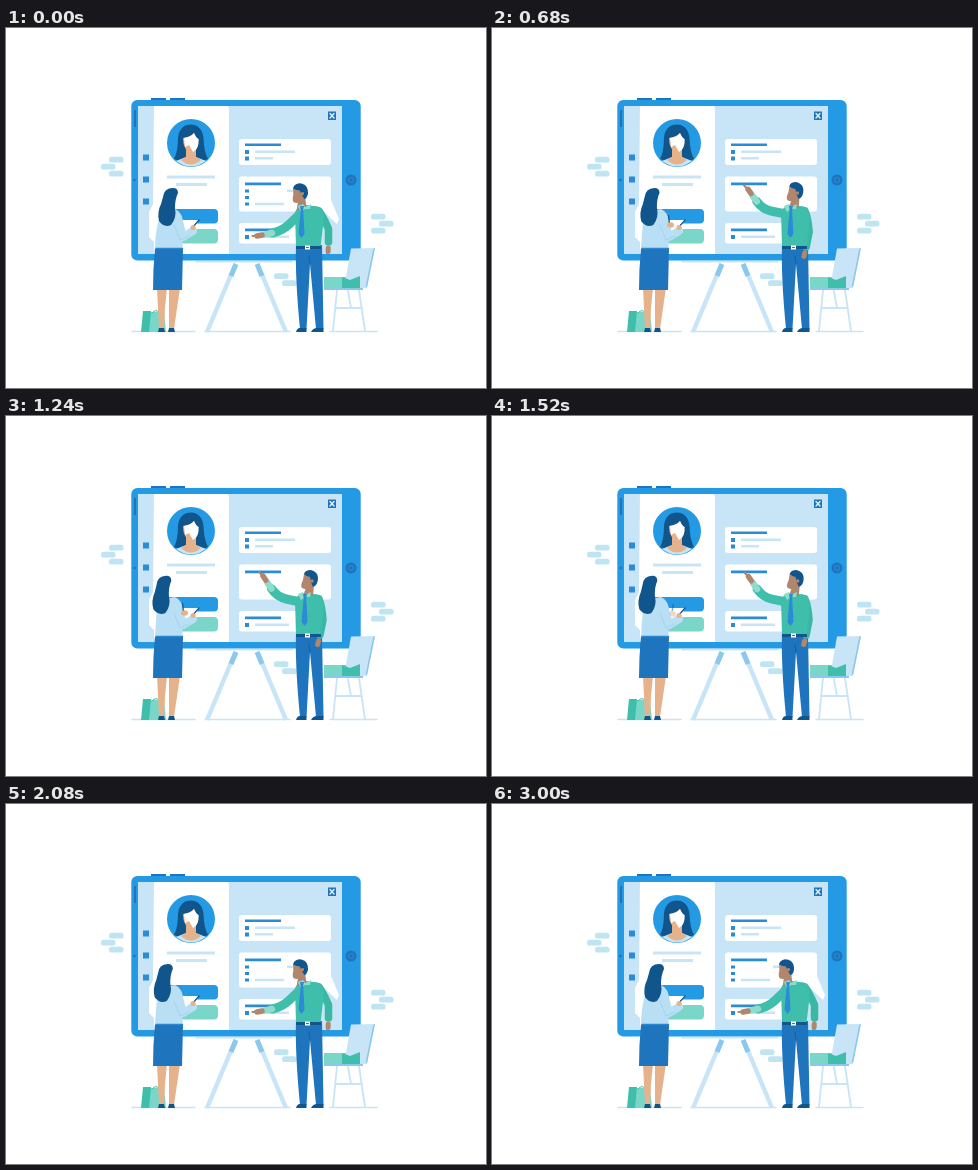
These frames come from a looping animation (480 px wide and 360 px high, 3040 ms). An HTML page:

```html
<!DOCTYPE html>
<html lang="en">
<head>
<meta charset="utf-8">
<title>Board presentation</title>
<style>
html, body { margin: 0; width: 100%; height: 100%; overflow: hidden; background: #fff; }
svg { display: block; width: 480px; height: 360px; }
.blue { fill: #259ae4; } .mid { fill: #1f75bd; } .dark { fill: #10568c; } .bar { fill: #2a8bd6; }
.pale { fill: #c8e5f7; } .mist { fill: #bfe4f2; } .white { fill: #fff; }
.teal { fill: #3fbfab; } .mint { fill: #7bd6ca; } .skin { fill: #e6b28c; } .tan { fill: #b0866c; }
.shirt { fill: #b9dff5; }
.line { fill: none; stroke-linecap: round; stroke-linejoin: round; }
</style>
</head>
<body>
<svg viewBox="0 0 480 360">
  <g id="clouds" class="mist"></g>

  <!-- easel -->
  <g class="line" stroke="#c8e5f7" stroke-width="1.6">
    <path d="M126 303.5H189M199 303.5H284M324 303.5H371M190 233.8H286"/>
    <path stroke-width="4.5" stroke-linecap="butt" d="M229.5 236L201 304M251.5 236L280 304"/>
    <path stroke="#8cc8ee" stroke-width="5" stroke-linecap="butt" d="M230 236L225 248M251 236L256 248"/>
  </g>

  <!-- board -->
  <path class="mid" d="M145 73v-3h15v3zM164 73v-3h15v3z"/>
  <rect class="blue" x="125.3" y="72" width="229.400" height="160.400" rx="6"/>
  <path class="mid" d="M128 82h2v17h-2z"/>
  <circle class="mid" cx="128.500" cy="152" r="1.300"/>
  <rect class="pale" x="132" y="78" width="204" height="148"/>
  <path class="white" d="M148 78H221Q223 78 223 82V226H148V214L143 209V184L147 176z"/>
  <circle class="mid" cx="345" cy="152" r="5.500"/>
  <circle class="line" cx="345" cy="152" r="2.500" stroke="#2c86cf" stroke-width="1.200"/>
  <path class="bar" d="M137 126.500h6v6h-6zM137 148.500h6v6h-6zM137 170.500h6v6h-6z"/>
  <path class="mid" d="M322 83.500h8v8.500h-8z"/>
  <path class="line" d="M324 85.500l4 4.500m0-4.500l-4 4.500" stroke="#e6f5fc" stroke-width="1.300"/>

  <!-- profile -->
  <circle class="blue" cx="185" cy="115" r="24"/>
  <path class="dark" d="M168 131Q172 124 172 109Q174 96.500 185 96.500Q196 97 197.500 110Q198 124 202 131Q194 135 185 133Q176 135 168 131z"/>
  <path class="pale" d="M170 133L180 129H190L200 133Q185 144 170 133z"/>
  <path class="skin" d="M180 120h10v9l5 3q-10 9-20 0l5-3z"/>
  <path class="skin" d="M177 110Q185 109 188 105Q190 110 192.500 111Q193 122 185.500 126Q177 122 177 110z"/>
  <path class="white" d="M178 110Q185 109 188 105Q190 110 192.500 111Q193 121 187 124L183 117L179 119z"/>
  <path class="pale" d="M161 147.500h48v3h-48zM170 155h31v3h-31z"/>
  <rect class="blue" x="160" y="181" width="52" height="14.500" rx="4"/>
  <rect class="mint" x="160" y="201" width="52" height="14.500" rx="4"/>

  <!-- cards -->
  <g class="white">
    <rect x="233" y="111" width="92" height="26" rx="3"/>
    <rect x="233" y="148.500" width="92" height="35" rx="3"/>
    <rect x="233" y="195" width="62" height="20.500" rx="3"/>
    <path id="gap" d="M312 172H325L333 191L331 196L316 182z"/>
  </g>
  <path class="bar" d="M239 115.500h36v2.600h-36zM239 154.600h36v2.600h-36zM239 200.600h36v2.600h-36z"/>
  <path class="bar" d="M239 122h4v4h-4zM239 128.500h4v4h-4zM239 207h4v4h-4z"/>
  <path class="pale" d="M249 122.500h40v2.500h-40zM249 129h18v2.500h-18zM249 207.500h34v2.500h-34z"/>
  <path id="bullets" class="bar" d="M239 161.500h4v3h-4zM239 168h4v3h-4zM239 174.500h4v3h-4z"/>
  <path id="rows" class="pale" d="M249 174.800h29v2.500h-29zM281 161.500h8v2.500h-8z"/>

  <!-- chair and laptop -->
  <g class="line" stroke="#c8e5f7" stroke-width="1.800">
    <path d="M331 262L327 303M353 262L359 303M329 280H356M342 263L345 280"/>
  </g>
  <path class="pale" d="M345 220.500L369 220L361 260H338z"/>
  <path class="line" d="M368 221L360.500 258" stroke="#8cc8ee" stroke-width="1.500"/>
  <path class="mint" d="M318 249H340V260H318z"/>
  <path class="teal" d="M336 249L344 252L354 248V260H336z"/>
  <path fill="#8cc8ee" d="M318 260h39v2h-39z"/>

  <!-- bag -->
  <path class="mint" d="M143 284h15l2 20h-21z"/>
  <path class="teal" d="M137 283h8l-2 21h-8z"/>
  <path class="line" d="M146 285q4-5 8 0" stroke="#3fbfab" stroke-width="1"/>

  <!-- woman -->
  <path class="skin" d="M151 260H161L159 280L158 301H153zM163 260H174L168 301H163z"/>
  <path class="dark" d="M152 304l1-4h5l1 4zM162 304l1-4h5l1 4z"/>
  <path class="mid" d="M149 220.500H177L176 262H147Q147 240 149 220.500z"/>
  <path id="blouse" class="shirt"/>
  <path class="line" d="M150 220.500H176.500" stroke="#2c86cf" stroke-width="1.500" stroke-linecap="butt"/>
  <path class="white" d="M177 192L193 192L186 204H176z"/>
  <path class="line" d="M186 200L193 192" stroke="#10568c" stroke-width="1.200"/>
  <path class="line" d="M172 190L177 209L187 203" stroke="#b9dff5" stroke-width="8"/>
  <path class="line" d="M168 197L174 212L183 208" stroke="#a1cfed" stroke-width=".8"/>
  <circle class="skin" cx="187" cy="199.500" r="2.500"/>
  <g id="pen">
    <path class="line" d="M177.500 196L176.500 187.500" stroke="#10568c" stroke-width="1.300"/>
    <ellipse class="skin" cx="178.500" cy="197" rx="3.500" ry="2.800"/>
  </g>
  <path id="hair" class="dark" d="M157 169Q158 160 167 160Q172 160 172 165Q169 171 169 180Q171 190 165 197Q158 200 153 193Q151 184 155 176z"/>

  <!-- man -->
  <path class="mid" d="M290 217H316L317.500 301H310L304 236L300.500 301H294Q289 250 290 217z"/>
  <path class="dark" d="M290 304q1-4 4-4h6.500v4zM305 304q2-4 6-4h6.500v4z"/>
  <path class="line" d="M304 236L303 228" stroke="#135f9f" stroke-width="1"/>
  <path id="farArm" class="line" stroke="#3bb8a4" stroke-width="7.500"/>
  <path id="farHand" class="line" stroke="#b0866c" stroke-width="5"/>
  <path class="teal" d="M289 184Q291 178 300 177L312 178.500Q319 182 317 198L314.500 219H290z"/>
  <path class="dark" d="M290 218h25v3h-25z"/>
  <path class="white" d="M299 217.500h5v4h-5z"/>
  <path class="line" d="M300.500 219.500h2" stroke="#1f75bd" stroke-width="1.200"/>
  <g id="head">
    <path class="tan" d="M301 169H308L307 180H297z"/>
    <path class="tan" d="M298 158Q303 154 308 157L307 170Q301 175 296 172Q294 170 297 164z"/>
    <path class="dark" d="M298 158Q299 154 305 154Q312 156 312 162Q312 169 307 171L305 166L304 161Q301 161 298 158z"/>
    <circle class="tan" cx="306" cy="165" r="1.700"/>
  </g>
  <path id="sleeve" class="line" stroke="#3fbfab" stroke-width="9"/>
  <path id="cuff" class="line" stroke="#8fdccd" stroke-width="6.500" stroke-linecap="butt"/>
  <path id="wrist" class="line" stroke="#b0866c" stroke-width="5.500"/>
  <path id="finger" class="line" stroke="#b0866c" stroke-width="2.200"/>
  <path fill="#8fdccd" d="M292 178L297 176L299 179L305 176L304 181L299 181L295 184z"/>
  <path id="tie" class="bar"/>
</svg>
<script>
const LOOP = 3040, STEP = 40;
const $ = id => document.getElementById(id);
const set = (id, name, value) => $(id).setAttribute(name, value);
const show = (id, on) => set(id, "visibility", on ? "visible" : "hidden");
const mix = (a, b, u) => a + (b - a) * u;
const mixPt = (a, b, u) => a.map((v, i) => mix(v, b[i], u));
const ease = u => u * u * (3 - 2 * u);

// Eased interpolation between [time, value] stops.
function track(stops, t) {
  const i = stops.findIndex(s => s[0] > t);
  if (i < 0) return stops[stops.length - 1][1];
  const [t0, a] = stops[i - 1], [t1, b] = stops[i];
  return mix(a, b, ease((t - t0) / (t1 - t0)));
}

// Parabola through a, m and b at u = 0, .5 and 1.
const bend = (a, m, b, u) => a.map((v, i) =>
  v * (1 - u) * (1 - 2 * u) + m[i] * 4 * u * (1 - u) + b[i] * u * (2 * u - 1));

const raise = [[0, 0], [160, 0], [680, .97], [1240, 1], [1480, 1], [2040, 0], [LOOP, 0]];
const turn = [[0, 0], [240, 0], [900, .9], [1240, 1], [1860, 1], [2560, 0], [LOOP, 0]];
const write = [[0, 0], [360, 0], [600, 1], [1320, 1], [1640, 0], [2040, 0], [2300, .65], [2480, .65], [2760, 0], [LOOP, 0]];

function cloud(x, y, shifts) {
  $("clouds").innerHTML += shifts.map((dx, i) =>
    `<rect x="${x + dx}" y="${y + i * 7}" width="14.5" height="5.8" rx="2.6"/>`).join("");
}
cloud(103, 128.7, [0, -8, 0]);
cloud(365, 185.7, [0, 8, 0]);
cloud(268, 245.2, [0, 8]);

function drawArm(p) {
  const elbow = bend([276, 203], [268, 190.5], [271, 181], p);
  const hand = bend([251, 208], [248, 184], [257, 160], p);
  const end = mixPt(elbow, hand, .4), cuff = mixPt(elbow, hand, .68);
  set("sleeve", "d", `M294 186L${mixPt([294, 186], elbow, .6)}Q${elbow} ${end}`);
  set("cuff", "d", `M${end}L${cuff}`);
  set("wrist", "d", `M${mixPt(elbow, hand, .8)}L${hand}`);
  set("finger", "d", `M${hand}l${mix(-4.5, -4, p)} ${-4 * Math.sqrt(p)}`);
}

function drawFarArm(p) {
  const elbow = mixPt([322.5, 201], [317, 204], p);
  const wrist = mixPt([322.5, 214], [314, 219], p);
  const hand = mixPt([322, 226], [311, 231], p);
  set("farArm", "d", `M313 183Q${mix(318, 316, p)} 190 ${elbow}L${wrist}`);
  set("farHand", "d", `M${mixPt(wrist, hand, .5)}L${mixPt(wrist, hand, .8)}`);
}

function draw(t) {
  const p = track(raise, t), q = track(turn, t), w = track(write, t);
  const away = 1 - p * p;
  drawArm(p);
  drawFarArm(p);
  set("head", "transform", `translate(${-8.5 * away} ${1.2 * away}) rotate(${-12 * away} 303 170)`);
  const tx = mix(295.5, 298.5, p);
  set("tie", "d", `M${tx - 1.5} 178h4l-.8 4L${tx + 3} 206L${tx} 210L${tx - 3} 206L${tx - .8} 182z`);
  set("hair", "transform", `translate(${-5.5 * q} 0) rotate(${-2 * q} 162 198)`);
  const back = mix(153, 151, q);
  set("blouse", "d", `M${back} 191Q158 182 169 181Q176 184 177 194L176.5 221H149Q${mix(149, 150, q)} 205 ${back} 191z`);
  set("pen", "transform", `translate(${3 * (1 - w)} ${1 - w}) rotate(${25 * (1 - w)} 178 197)`);
  set("pen", "opacity", Math.min(1, w * 1.6));
  show("bullets", p < .75);
  show("rows", p < .35);
  show("gap", p < .35);
}

function tick() {
  const t = performance.now() % LOOP;
  draw(Math.floor(t / STEP) * STEP);
  requestAnimationFrame(tick);
}
tick();
</script>
</body>
</html>
```
